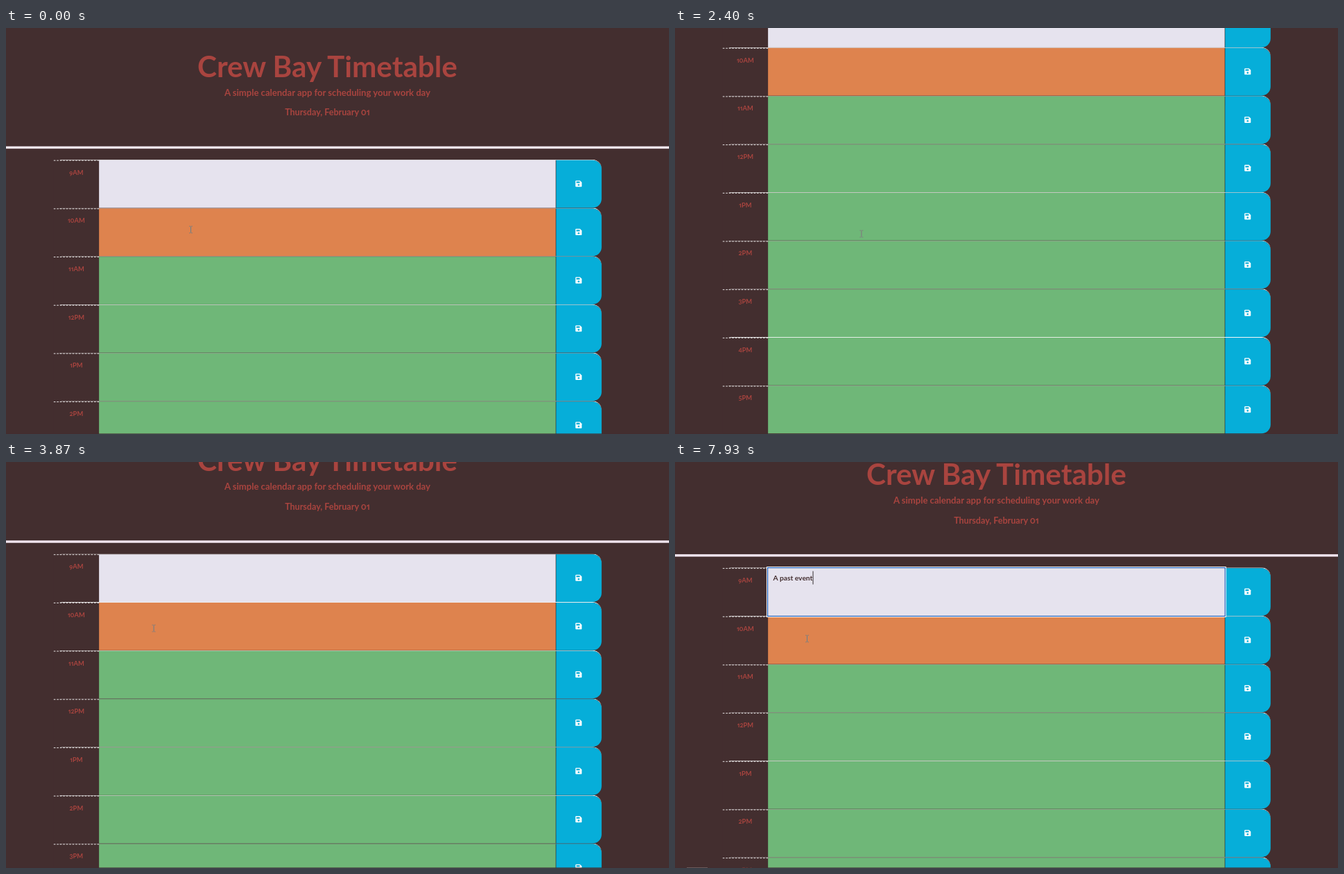
These frames come from a looping animation (956x586 px, 8 s). An HTML page:

```html
<!DOCTYPE html>
<html lang="en">
<head>
<meta charset="utf-8">
<title>Day planner</title>
<style>
  html, body { margin: 0; width: 100%; height: 100%; overflow: hidden; }
  body { position: relative; background: #432e2f; color: #a9443f; font: 700 15px/1 Lato, sans-serif;
    font-variant-numeric: oldstyle-nums proportional-nums; }
  #stage { position: absolute; inset: 0; overflow: hidden; background: #432e2f; }
  #page { position: absolute; left: 0; top: 0; width: 1098px; transform-origin: 0 0; }
  .head { position: absolute; left: 78.6px; width: 907px; text-align: center; white-space: pre; }
  .title { top: 38.2px; font-size: 48.5px; }
  .lead { top: 98.8px; }
  .date { top: 133px; font-size: 14.4px; }
  .rule { position: absolute; top: 196px; width: 100%; height: 4px; background: #f0e4ee; }
  #rows { position: absolute; top: 217.5px; left: 78.6px; width: 907px; }
  .row { display: grid; grid-template-columns: 1fr 10fr 1fr; box-sizing: border-box;
    height: 80px; border-top: 1px solid #fff; border-radius: 15px; }
  .hour { border-top: 1px dashed #fff; padding-top: 14.9px; background: #432e2f;
    font-size: 10.7px; text-align: center; }
  .slot { position: relative; box-sizing: border-box; padding: 5px 8.4px; background: #6fb778;
    color: #432e2f; font-size: 11.8px; line-height: 22px; white-space: pre; }
  .past { background: #e6e3ee; }
  .present { background: #de834e; }
  .focus { z-index: 1; box-shadow: 0 0 0 1.3px #1358b8, 0 0 0 2.5px #fff; }
  .save { display: grid; place-items: center; background: #06aed9; border-left: 1px solid #1b1415;
    border-radius: 0 15px 15px 0; }
  .save svg { width: 12px; height: 12px; margin-right: 1px; }
  #caret { position: absolute; top: 5px; width: 1px; height: 22px; background: #1b1415; }
  #edge { position: absolute; bottom: 0; width: 100%; height: 1px; background: rgba(67, 46, 47, .6); }
  #hint { position: absolute; left: 17px; bottom: 0; width: 30px; height: 1px; background: #6b5a5b; }
  #cursor { position: absolute; left: -3px; top: -5.5px; width: 6px; height: 11px;
    opacity: .62; mix-blend-mode: difference; }
</style>
</head>
<body>
<div id="stage">
  <div id="page">
    <div class="head title">Crew Bay Timetable</div>
    <div class="head lead">A simple calendar app for scheduling your work day</div>
    <div class="head date">Thursday, February 01</div>
    <div class="rule"></div>
    <div id="rows"></div>
  </div>
  <div id="edge"></div>
  <div id="hint"></div>
  <svg id="cursor" viewBox="0 0 6 11" fill="none" stroke="#fff">
    <path d="M.5 .5H2.5M3.5 .5H5.5M3 1V10M.5 10.5H2.5M3.5 10.5H5.5"/>
  </svg>
</div>
<script>
  const LOOP = 8000, FPS = 15, SCALE = .871;
  const TYPE_START = 5400, TYPE_END = 6933, BLINK = 533;
  const TEXT = 'A past event';
  const $ = id => document.getElementById(id);

  const saveIcon = `<svg viewBox="0 0 16 16"><path fill="#fff" d="M2.5 1H11L15 5V13.5Q15 15 13.5 15H2.5Q1 15 1 13.5V2.5Q1 1 2.5 1Z"/>
    <path fill="#06aed9" d="M3 3H10.5V6.5H3Z"/><circle cx="8" cy="10.8" r="2" fill="#06aed9"/></svg>`;
  const hourName = h => `${(h + 11) % 12 + 1}${h < 12 ? 'AM' : 'PM'}`;
  const state = h => h < 10 ? 'past' : h === 10 ? 'present' : '';
  for (let h = 9; h <= 17; h++) {
    $('rows').innerHTML += `<div class="row"><div class="hour">${hourName(h)}</div>
      <div class="slot ${state(h)}"></div><div class="save">${saveIcon}</div></div>`;
  }
  const slot = document.querySelector('.slot');
  slot.innerHTML = '<span id="typed"></span><i id="caret"></i>';

  const progress = (t, from, to) => Math.min(1, Math.max(0, (t - from) / (to - from)));
  const smooth = p => p * p * (3 - 2 * p);
  // Eased 0..1: "a" softens the start, "b" the end.
  const glide = (p, a, b) => 1 - (1 - p ** a) ** b;
  const show = (el, on) => { el.style.visibility = on ? 'visible' : 'hidden'; };

  const scrollAt = t =>
    231.6 * glide(progress(t, 333, 1533), 1.4, 1.96) - 194 * glide(progress(t, 3133, 4000), 2, 1.8);

  // Each move eases to (x, y), swaying sideways by a sine of the given half-turns.
  const moves = [
    { from: 2333, to: 2733, x: 257, y: 369.5, sway: 13, halfTurns: 1 },
    { from: 2867, to: 3000, x: 262.5, y: 366.5, sway: 0, halfTurns: 0 },
    { from: 3533, to: 4067, x: 190.5, y: 181.5, sway: 0, halfTurns: 0 },
    { from: 7467, to: 7933, x: 190.5, y: 254.5, sway: 6, halfTurns: 2 }
  ];
  function cursorAt(t) {
    let x = 266.5, y = 290.5;
    for (const m of moves) {
      const p = smooth(progress(t, m.from, m.to));
      x += (m.x - x) * p + m.sway * Math.sin(Math.PI * m.halfTurns * p);
      y += (m.y - y) * p;
    }
    return [x, y];
  }

  // Typing starts hesitantly and speeds up.
  const typedCount = t => t < TYPE_START ? 0 :
    1 + Math.floor((TEXT.length - 1) * progress(t, TYPE_START, TYPE_END) ** 1.25);

  function caretOn(t) {
    if (t >= TYPE_START && t < TYPE_END) return true;
    const blinkStart = t < TYPE_START ? 4467 : 6600;
    return t >= blinkStart && (t - blinkStart) % (2 * BLINK) < BLINK;
  }

  function draw(time) {
    // The picture advances in whole ticks.
    const t = Math.floor((time + 4) * FPS / 1000) * 1000 / FPS + 1;
    $('page').style.transform = `translateY(${-scrollAt(t)}px) scale(${SCALE})`;

    const [x, y] = cursorAt(t);
    $('cursor').style.transform = `translate(${x}px, ${y}px)`;
    show($('cursor'), t < TYPE_START || t >= 7533);

    slot.classList.toggle('focus', t >= 4467);
    show($('hint'), t >= 4600);
    $('typed').textContent = TEXT.slice(0, typedCount(t));
    show($('caret'), caretOn(t));
  }

  const start = performance.now();
  function frame() {
    draw((performance.now() - start) % LOOP);
    requestAnimationFrame(frame);
  }
  draw(0);
  requestAnimationFrame(frame);
</script>
</body>
</html>
```
